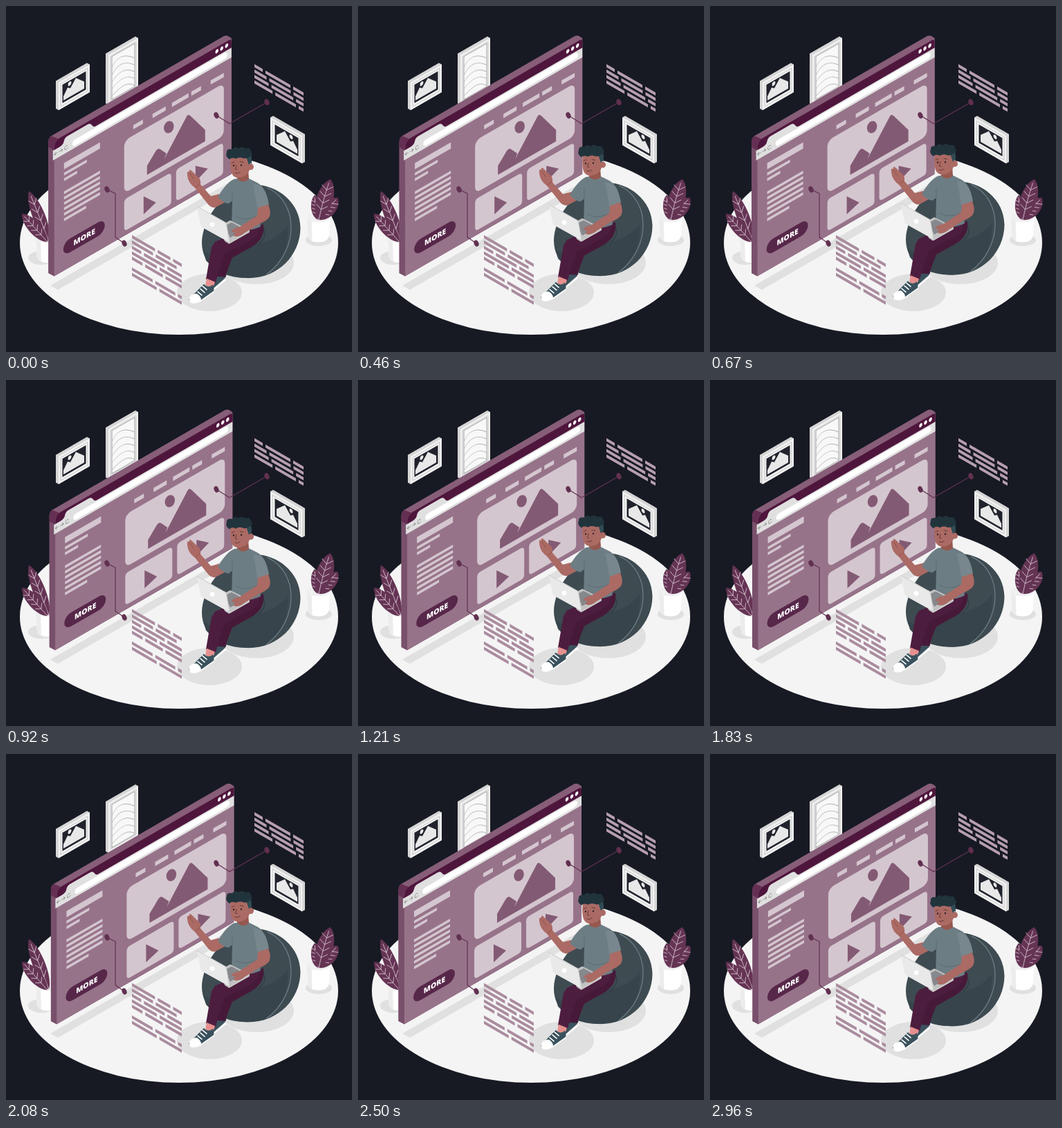
Animation of 500 by 500 pixels, one loop 3000 ms. Source, as an HTML page:

```html
<!DOCTYPE html>
<html lang="en">
<head>
<meta charset="utf-8">
<style>
html,body{margin:0;width:100%;height:100%;overflow:hidden;background:#171a23}
svg{display:block;width:100vw;height:100vh}
.n{fill:none;stroke-linecap:round;stroke-linejoin:round}
</style>
</head>
<body>
<svg viewBox="0 0 500 500">
<!-- floor and shadows -->
<ellipse cx="250" cy="342" rx="230" ry="133" fill="#f4f4f4"/>
<g fill="#e0e0e0">
  <path d="M64 404 75 410 330 263 319 257Z"/>
  <ellipse cx="362" cy="371" rx="54" ry="31"/>
  <ellipse cx="294" cy="414" rx="47" ry="27"/>
  <ellipse cx="51" cy="364" rx="19" ry="10"/>
  <ellipse cx="452" cy="338" rx="19" ry="9"/>
</g>
<g id="frames"></g>
<g id="plants"></g>

<!-- browser window -->
<g id="win">
  <path d="M61.5 196Q61.5 190 66 187.500L315 43.500Q318 42 321 43.200L326 46.500V243L70 390.500 61.500 386Z" fill="#875d78"/>
  <path d="M61.500 196 70 202V390.500L61.500 386Z" fill="#79506b"/>
  <path d="M61.500 204V196Q61.500 190 66 188L76 192 70 209Z" fill="#642f53"/>
  <g transform="matrix(1 -.577 0 1 70 0)">
    <path d="M0 205Q0 195 8 195H252Q256 195 256 199V390H0Z" fill="#97738a"/>
    <path d="M0 209V205Q0 195 8 195H252Q256 195 256 199V209Z" fill="#4f163d"/>
    <path d="M-2 208H8Q13 208 14 203 15 199 19 199H48Q52 199 54 203 56 208 60 208H256V222H-2Z" fill="#e0e0e0"/>
    <rect x="26" y="210" width="224" height="9" rx="4.500" fill="#fff"/>
    <path class="n" d="M0 214.500H5M2 212.500 0 214.500 2 216.500M7 214.500H12M10 212.500 12 214.500 10 216.500M19 212.500A2.400 2.700 0 1 0 19.600 215.500" stroke="#8b8b8b" stroke-width=".8"/>
    <g id="buttons" fill="#fff"></g>
    <g id="side" fill="#d4c6cf"></g>
    <g fill="#d4c6cf">
      <rect x="101" y="253" width="144" height="76" rx="8"/>
      <rect x="101" y="338" width="68" height="46" rx="5"/>
      <rect x="176" y="338" width="68" height="46" rx="5"/>
    </g>
    <rect x="13" y="349" width="60" height="20" rx="10" fill="#57274a"/>
    <text x="43.500" y="362.500" text-anchor="middle" font-family="'Open Sans',Inter,sans-serif" font-weight="800" font-size="10.500" fill="#fff">MORE</text>
  </g>
  <g fill="#835a74">
    <ellipse cx="235.500" cy="175" rx="7" ry="9" transform="rotate(20 235.500 175)"/>
    <path d="M204 244V231L217 209Q220 205 223 207L232 213 229 221 261 160Q263 155 267 159L288 179V195.500Z"/>
    <path d="M199 275V301L217 284Z"/><path d="M274 231V254L292 235Z"/>
  </g>
</g>

<!-- callouts -->
<path class="n" d="M304 158 323 170 377 139M146 265 158 271V334L171 343" stroke="#613050" stroke-width="1.200"/>
<g id="dots" fill="#613050"></g>
<g id="noteA" transform="matrix(1 .577 0 1 359 84)" fill="#b79fae"></g>
<g id="noteB" transform="matrix(1 .577 0 1 182 331)" fill="#aa8b9e"></g>

<!-- reader on the beanbag -->
<g id="man">
  <path d="M342 262C375 249 425 275 425.500 321 425 360 394 393.500 350 393.500 314 392 283 377 283 342 284 308 312 271 342 262Z" fill="#3e4b51"/>
  <path d="M285 355Q320 378 357 345 390 341 407 318 411 365 372 390 318 402 289 368Z" fill="#37444b"/>
  <path class="n" d="M378 263C423 284 424 352 377 388" stroke="#718088" stroke-width="1.200"/>
  <path class="n" d="M370 320Q380 333 364 345" stroke="#323e45" stroke-width="1.500"/>

  <!-- shoes and legs -->
  <path d="M306 380 318 378Q321 388 316 394L300 408 290 405Z" fill="#3a525d"/>
  <path class="n" d="M317 396 300 410" stroke="#fff" stroke-width="2"/>
  <path d="M372 316Q375 337 354 349L327 364Q320 381 317 392L303 391 308 353 345 318Z" fill="#471939"/>
  <path d="M328 317H366Q369 333 345 343L316 358Q309 377 303 400 296 402 289 395L297 349 302 341 326 331Z" fill="#4d1d3f"/>
  <path d="M290 394 302 399 299 408 288 404Z" fill="#e5908e"/>
  <path d="M286 402Q292 409 299 403 302 409 299 414L279 428Q268 431 264 424 264 419 272 416Z" fill="#3a525d"/>
  <path d="M264 422Q268 415 276 416 282 420 282 425 273 432 266 428Z" fill="#fff"/>
  <path class="n" d="M267 428.500Q275 431 283 425L300 413M277 413 283 418M281 409 287 414M284 405 290 410" stroke="#fff" stroke-width="1.600"/>

  <!-- raised arm -->
  <path d="M308 272 296 275 281 258Q282 249 276 246L270 240Q264 234 265 240 261 238 262 245 263 256 273 263L293 288Q299 294 305 290L322 281Z" fill="#ab6a64"/>
  <path class="n" d="M265 241 271 250M274 262 280 257" stroke="#8c5049" stroke-width=".8"/>

  <!-- shirt -->
  <path d="M331 250Q320 253 306 276 312 284 321 286L327 282 326 320Q346 329 368 319L365 291 379 287Q377 264 364 256L350 249Z" fill="#6d7d84"/>
  <path d="M357 258Q375 257 380 287 374 294 363 293 361 276 357 258Z" fill="#77878d"/>
  <path class="n" d="M327 268V282M332 304Q345 312 361 304" stroke="#58686f" stroke-width=".8"/>

  <!-- head -->
  <path d="M334 240 350 236 351 250Q343 258 334 250Z" fill="#96584f"/>
  <path d="M325 217Q323 233 326 242 330 250 339 248 349 246 352 237 358 238 358 232 356 226 351 229L350 215Z" fill="#ab6a64"/>
  <path d="M343 211Q356 206 355 228 353 226 351 230L348 221Z" fill="#304b54"/>
  <path d="M323 222Q316 217 319 212 318 206 327 207 331 202 336 206 341 202 345 206 353 204 354 210 358 216 353 217 348 222 342 220 337 218 332 221 326 218 323 222Z" fill="#21343c"/>
  <path class="n" d="M329 230.500V231M340 230V230.500" stroke="#2b2529" stroke-width="2.200"/>
  <path class="n" d="M326 227 330 225.500M338 225 343 226M333 230 331.500 236 334 236.500M331 241.500Q335 243 338 240.500" stroke="#693a37" stroke-width="1"/>

  <!-- laptop and typing arm -->
  <path d="M309 318 324 310 352 324V327L322 344 316 340Z" fill="#c2c2c2"/>
  <path d="M316 318 326 313 345 323 324 335Z" fill="#85888c"/>
  <path d="M364 292 379 287Q384 299 380 306 376 311 366 315L345 328Q337 335 330 333 327 330 332 327L325 327Q328 321 337 320L363 303Z" fill="#ab6a64"/>
  <path d="M276 290 315 312Q318 313 318.500 316L323 342 285 321Q282 319 281 316Z" fill="#e9e9e9"/>
  <path class="n" d="M276 290 315 312Q318 313 318.500 316L323 343 351 327" stroke="#d2d2d2" stroke-width="1.200"/>
  <circle cx="298" cy="316" r="3.400" fill="#fff"/>
</g>
</svg>
<script>
const $ = id => document.getElementById(id);
const range = (n, make) => Array.from({length: n}, (_, i) => make(i)).join('');
const bar = (x, y, w, h) => `<rect x="${x}" y="${y}" width="${w}" height="${h}"/>`;
const dot = (x, y, rx, ry, turn = 0) =>
  `<ellipse rx="${rx}" ry="${ry}" transform="translate(${x} ${y}) rotate(${turn})"/>`;

let seed = 7;
const rnd = () => (seed = seed * 16807 % 2147483647) / 2147483647;

// Wall frame in isometric view; dir -1 mirrors it
function frame(x, y, dir, w, h, art) {
  return `<g transform="matrix(${dir} -.577 0 1 ${x} ${y})">
    <path d="M-4-4.600H${w - 4}L${w} 0V${h}H0L-4 ${h - 4.6}Z" fill="#d6d6d6"/>
    <path d="M0 0H${w}V${h}H0Z" fill="#f2f2f2"/>
    <path d="M3 3.500H${w - 3}V${h - 3.5}H3Z" fill="none" stroke="#bbb" stroke-width=".7"/>${art}</g>`;
}
const scene = `<path d="M5.500 6.500H39.500V33H5.500Z" fill="#20232c"/>
  <g fill="#e8e8e8"><path d="M7 30V24L13 15 17 18 25 8 37 20V30Z"/>${dot(16, 11, 2.5, 3)}</g>`;
const waves = `<path d="M5 5H38V67H5Z" fill="#f8f8f8" stroke="#8d8d8d" stroke-width=".8"/>
  <path class="n" stroke="#c2c2c2" d="${range(5, i => `M5 ${22 + i * 10}Q${14 + i * 3} ${2 + i * 12} 38 ${26 + i * 10}`)}"/>`;
$('frames').innerHTML = frame(76, 110.5, 1, 45, 40, scene) +
  frame(148, 71, 1, 43, 72, waves) + frame(428, 187.5, -1, 46, 40, scene);

// Leaf with its base at x, y, and veins branching off the middle
function leaf(x, y, len, turn, w, bend) {
  const veins = range(4, i => {
    const t = .25 + i * .16, cx = bend * t * t, cy = -len * t;
    return `M${cx - w * .5} ${cy - len * .1}L${cx} ${cy} ${cx + w * .5} ${cy - len * .1}`;
  });
  return `<g transform="translate(${x} ${y}) rotate(${turn})">
    <path d="M0 0C${-w} ${-len * .2} ${bend - w} ${-len * .8} ${bend} ${-len}
      C${bend + w} ${-len * .8} ${w} ${-len * .2} 0 0" fill="#653454"/>
    <path class="n" d="M0 0Q0 ${-len * .5} ${bend * .8} ${-len * .9}${veins}" stroke="#d8c5d1" stroke-width=".8"/></g>`;
}
const pot = (x, y) => `<g transform="translate(${x} ${y})">
  <path d="M-17 0H17L15 28Q12 36 0 36T-15 28Z" fill="#fff"/>
  <path d="M-17 0H-10L-9 34Q-15 32-15 28Z" fill="#ececec"/><g fill="#f0f0f0">${dot(0, 0, 17, 7)}</g></g>`;
$('plants').innerHTML = pot(60, 335) + leaf(62, 340, 78, -21, 12, -1) + leaf(60, 341, 55, -42, 12, 0) +
  pot(451.5, 305.5) + leaf(451, 309, 36, -13, 10, 3) + leaf(452, 309, 42, 38, 14, 2) + leaf(452, 309, 61, 12, 16, 4);

// Window details
$('buttons').innerHTML = range(3, i => dot(235 + 7 * i, 201, 2.3, 2.8));
$('side').innerHTML = range(5, i => bar(114 + 28 * i, 238, 14 + i % 3 * 5, 6)) +
  bar(14, 235, 52, 9) + range(2, i => bar(14, 249 + 8 * i, 33 - 14 * i, 4)) +
  range(6, i => bar(14, 276 + 7.8 * i, i < 5 ? 52 : 32, 4));

// Rows of words with random lengths; one row may stay blank
const words = (w, rows, blank) => range(rows, i => {
  let out = '';
  for (let x = 0; i !== blank && x < w - 5;) {
    const len = Math.min(w - x, 12 + rnd() * 26);
    out += bar(x, i * 7.8, len, 4.5);
    x += len + 4;
  }
  return out;
});
$('noteA').innerHTML = words(71, 4);
$('noteB').innerHTML = words(72, 8, 5);
$('dots').innerHTML = [[304, 158], [377, 139], [146, 265], [171, 343]]
  .map(([x, y]) => dot(x, y, 3.3, 4.8, -25)).join('');

// Alternating swing that doubles up to 4 px and dies away symmetrically
const swing = i => (-1) ** i * Math.min(4, Math.floor(2 ** (Math.min(i, 10 - i) - 1)));
const start = performance.now();
function draw(now) {
  const t = Math.max(0, now - start) + 30;
  const k = t % 1500 / 150, i = Math.floor(k);
  const dx = swing(i) + (swing(i + 1) - swing(i)) * (k - i);
  const dy = 10 * (1 - Math.abs(t % 3000 / 1500 - 1));
  $('win').setAttribute('transform', `translate(${dx} 0)`);
  $('man').setAttribute('transform', `translate(0 ${-dy})`);
  requestAnimationFrame(draw);
}
draw(start);
</script>
</body>
</html>
```
